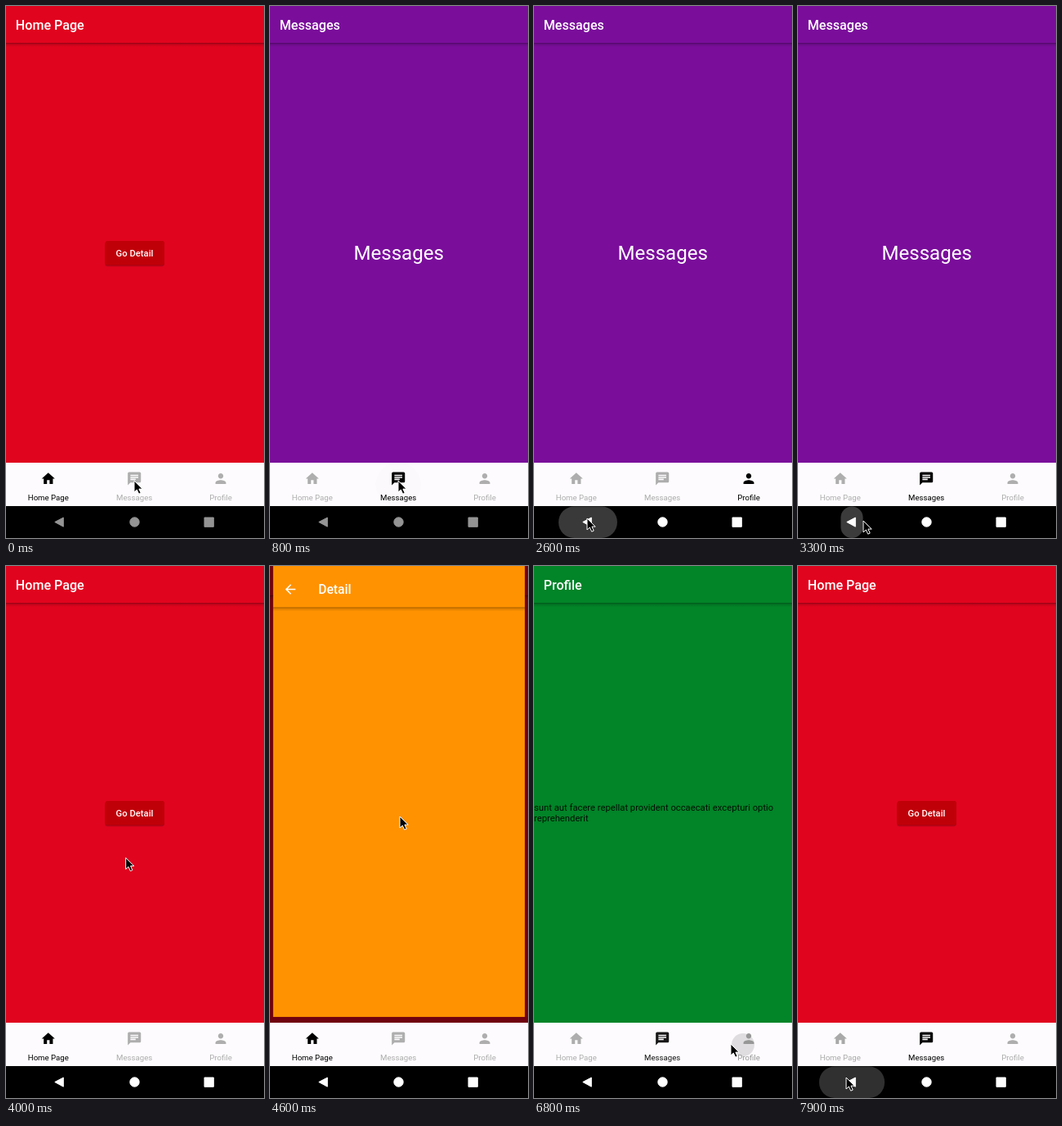
An HTML page that plays this animation: 316 px wide and 650 px high, repeating every 8000 ms.

```html
<!DOCTYPE html>
<html lang="en">
<head>
<meta charset="utf-8">
<title>Tab navigation demo</title>
<style>
  html, body { margin: 0; width: 100%; height: 100%; overflow: hidden; background: #000; }
  svg { display: block; width: 316px; height: 650px; }
  text { font-family: Roboto, Arial, sans-serif; }
  .title { font-size: 16.08px; font-weight: 500; fill: #fff; }
  .label { font-size: 9.65px; text-anchor: middle; }
  .button { font-size: 11.26px; font-weight: 500; fill: #fff; text-anchor: middle; }
  .big { font-size: 24.1px; fill: #fff; text-anchor: middle; }
  .body { font-size: 11.26px; fill: #000; fill-opacity: .87; }
</style>
</head>
<body>
<svg viewBox="0 0 316 650" xmlns="http://www.w3.org/2000/svg">
  <defs>
    <clipPath id="view"><rect width="316" height="558"/></clipPath>
    <clipPath id="barClip"><rect y="557" width="316" height="54"/></clipPath>
    <linearGradient id="shade" x2="0" y2="1">
      <stop offset="0" stop-color="#000" stop-opacity=".34"/>
      <stop offset=".4" stop-color="#000" stop-opacity=".13"/>
      <stop offset="1" stop-color="#000" stop-opacity="0"/>
    </linearGradient>
    <g id="appBarShade"><rect y="45" width="316" height="5" fill="url(#shade)"/></g>
  </defs>

  <g clip-path="url(#view)">
    <g id="home">
      <rect y="-20" width="316" height="578" fill="#e1041e"/>
      <use href="#appBarShade"/>
      <text class="title" x="11.8" y="28.5">Home Page</text>
      <rect x="121" y="288.5" width="73" height="30" rx="3.5" fill="#000" opacity=".12"/>
      <rect x="121.5" y="287.5" width="72.5" height="30" rx="3" fill="#000" opacity=".15"/>
      <rect x="121.5" y="287" width="72.5" height="29.5" rx="3" fill="#c00008"/>
      <text class="button" x="157.5" y="305.6">Go Detail</text>
    </g>
    <g id="messages">
      <rect y="-20" width="316" height="578" fill="#7a0e9b"/>
      <use href="#appBarShade"/>
      <text class="title" x="11.8" y="28.5">Messages</text>
      <text class="big" x="157.7" y="310">Messages</text>
    </g>
    <g id="profile">
      <rect y="-20" width="316" height="578" fill="#028428"/>
      <use href="#appBarShade"/>
      <text class="title" x="11.8" y="28.5">Profile</text>
      <text class="body" x="0" y="299.3">sunt aut facere repellat provident occaecati excepturi optio</text>
      <text class="body" x="0" y="312.3">reprehenderit</text>
    </g>
    <rect id="scrim" width="316" height="558"/>
    <g id="detail">
      <rect y="-20" width="316" height="578" fill="#ff9200"/>
      <use href="#appBarShade"/>
      <path transform="translate(12 12.9) scale(.804)" fill="#fff"
        d="M20 11H7.83l5.59-5.59L12 4l-8 8 8 8 1.41-1.41L7.83 13H20z"/>
      <text class="title" x="56.7" y="28.5">Detail</text>
    </g>
  </g>

  <rect y="558" width="316" height="53" fill="#fdfbfd"/>
  <g clip-path="url(#barClip)"><circle id="ripple"/></g>
  <g id="tabs"></g>

  <rect y="611" width="316" height="39" fill="#000"/>
  <rect id="pill" y="611.5" height="38.5" fill="#fff"/>
  <g id="sysNav" stroke-linejoin="round" stroke-width="1">
    <path d="M59.8 630.5 70.3 625V636.2Z"/>
    <circle cx="157.5" cy="630.5" r="5.7"/>
    <rect x="243" y="625" width="11.3" height="11.3"/>
  </g>

  <path id="cursor" d="M0 0V14L3.3 11 5.7 16.2 8.2 15.1 5.9 10.1H10.2Z"
    fill="#000" stroke="#fff" stroke-width="1" stroke-linejoin="round"/>
</svg>
<script>
const LOOP = 8000, STEP = 100;
const HOME = 0, MESSAGES = 1, PROFILE = 2;
const el = id => document.getElementById(id);
const pages = ['home', 'messages', 'profile'].map(el);
const clamp = v => Math.max(0, Math.min(1, v));
const mix = (a, b, k) => a + (b - a) * k;
const set = (node, attrs) => {
  for (const key in attrs) node.setAttribute(key, attrs[key]);
};
const show = (node, on) => set(node, { display: on ? 'inline' : 'none' });
const latest = (list, t) => list.filter(item => item[0] <= t).pop();

// Cubic timing curve, solved by bisection.
function bezier(x1, y1, x2, y2) {
  const at = (a, b, s) => 3 * (1 - s) ** 2 * s * a + 3 * (1 - s) * s * s * b + s ** 3;
  return x => {
    if (x <= 0 || x >= 1) return clamp(x);
    let lo = 0, hi = 1;
    for (let i = 0; i < 24; i++) {
      const mid = (lo + hi) / 2;
      if (at(x1, x2, mid) < x) lo = mid; else hi = mid;
    }
    return at(y1, y2, lo);
  };
}
const standard = bezier(.4, 0, .2, 1);
const zoomIn = bezier(.05, 0, .1333, .06);
const zoomOut = bezier(.2083, .82, .25, 1);
const zoomCurve = u => u < 1 / 6 ? .4 * zoomIn(u * 6) : .4 + .6 * zoomOut((u - 1 / 6) * 1.2);

// time, selected tab
const route = [
  [-900, HOME], [480, MESSAGES], [1505, PROFILE], [2590, MESSAGES], [3390, HOME],
  [6450, MESSAGES], [6760, PROFILE], [7390, MESSAGES], [7880, HOME]
];
// time, touch x, tab centre x
const taps = [[480, 157, 157.3], [1505, 263, 263], [6450, 157, 157.3], [6760, 242, 263]];
const backPresses = [2470, 3270, 5310, 7200, 7700];
const detailOpen = 4490, detailClose = 5503, zoomTime = 300;
// time, x, y
const pointer = [
  [0, 157, 580], [800, 157, 580], [1200, 262, 579], [1700, 262, 579], [2400, 65, 626],
  [2900, 65, 626], [3200, 80, 629], [3400, 80, 629], [4200, 159, 306], [4700, 159, 306],
  [5200, 70, 632], [5700, 70, 632], [6000, 84, 618], [6100, 84, 618], [6400, 157, 582],
  [6500, 157, 582], [6700, 241, 584], [6900, 241, 584], [7200, 59, 625], [LOOP, 59, 625]
];

const tabs = [
  ['Home Page', 51.8, 'M10 20v-6h4v6h5v-8h3L12 3 2 12h3v8z'],
  ['Messages', 157.2, 'M20 2H4c-1.1 0-1.99.9-1.99 2L2 22l4-4h14c1.1 0 2-.9 2-2V4c0-1.1-.9-2-2-2zM6 9h12v2H6V9zm8 5H6v-2h8v2zm4-6H6V6h12v2z'],
  ['Profile', 263, 'M12 12c2.21 0 4-1.79 4-4s-1.79-4-4-4-4 1.79-4 4 1.79 4 4 4zm0 2c-2.67 0-8 1.34-8 4v2h16v-2c0-2.66-5.33-4-8-4z']
].map(([name, x, icon]) => {
  const g = document.createElementNS('http://www.w3.org/2000/svg', 'g');
  g.innerHTML = `<path transform="translate(${x - 9.65} 567.9) scale(.804)" d="${icon}"/>
    <text class="label" x="${x}" y="604">${name}</text>`;
  el('tabs').append(g);
  return g;
});

const zoom = (node, s) =>
  set(node, { transform: `translate(158 267) scale(${s}) translate(-158 -267)` });

function drawPages(t, current) {
  const opening = clamp((t - detailOpen) / zoomTime);
  const closing = clamp((t - detailClose) / zoomTime);
  const k = zoomCurve(opening), back = zoomCurve(closing);
  const leaving = t >= detailClose;
  const fade = leaving ? 1 - clamp((closing - .0825) / .125) : clamp((opening - .125) / .125);

  pages.forEach((page, i) => show(page, i === current));
  show(el('detail'), fade > 0);
  set(el('detail'), { opacity: fade });
  zoom(el('detail'), leaving ? mix(1, .9, back) : mix(.85, 1, k));
  zoom(el('home'), leaving ? mix(1.1, 1, back) : mix(1, 1.05, k));
  set(el('scrim'), { opacity: leaving ? 0 : .6 * k });
}

function drawTabs(t) {
  const index = route.indexOf(latest(route, t));
  const [since, current] = route[index];
  const previous = index ? route[index - 1][1] : current;
  const k = standard((t - since) / 200);
  tabs.forEach((tab, i) => {
    const active = i === current ? (previous === current ? 1 : k) : i === previous ? 1 - k : 0;
    const c = Math.round(mix(174, 0, active));
    set(tab, { fill: `rgb(${c},${c},${c})` });
  });

  const tap = latest(taps, t), age = tap ? t - tap[0] : LOOP;
  show(el('ripple'), age < 450);
  if (age < 450) set(el('ripple'), {
    cx: mix(tap[1], tap[2], clamp(age / 60)), cy: 585,
    r: 28 * clamp(age / 80), opacity: .17 * Math.exp(-age / 110)
  });
  return current;
}

function drawSystemNav(t) {
  const press = backPresses.filter(p => p <= t).pop() ?? -LOOP;
  const age = t - press;
  const w = 82 * (1 - (1 - clamp(age / 350)) ** 4.5);
  set(el('pill'), {
    x: 66 - w / 2, width: w, rx: Math.min(19, w / 2), ry: Math.min(19, w / 2),
    opacity: .23 * (1 - clamp((age - 120) / 450))
  });
  const color = t < backPresses[0] ? '#949494' : '#fff';
  set(el('sysNav'), { fill: color, stroke: color });
}

function drawPointer(t) {
  const i = pointer.findIndex(p => p[0] > t);
  const [t0, x0, y0] = pointer[i - 1], [t1, x1, y1] = pointer[i];
  const u = (t - t0) / (t1 - t0), k = u * u * (3 - 2 * u);
  set(el('cursor'), { transform: `translate(${mix(x0, x1, k)} ${mix(y0, y1, k)})` });
}

function draw(t) {
  drawPages(t, drawTabs(t));
  drawSystemNav(t);
  drawPointer(t);
}

const start = performance.now();
function tick() {
  const t = (performance.now() - start) % LOOP;
  draw(Math.floor(t / STEP) * STEP);
  requestAnimationFrame(tick);
}
tick();
</script>
</body>
</html>
```
